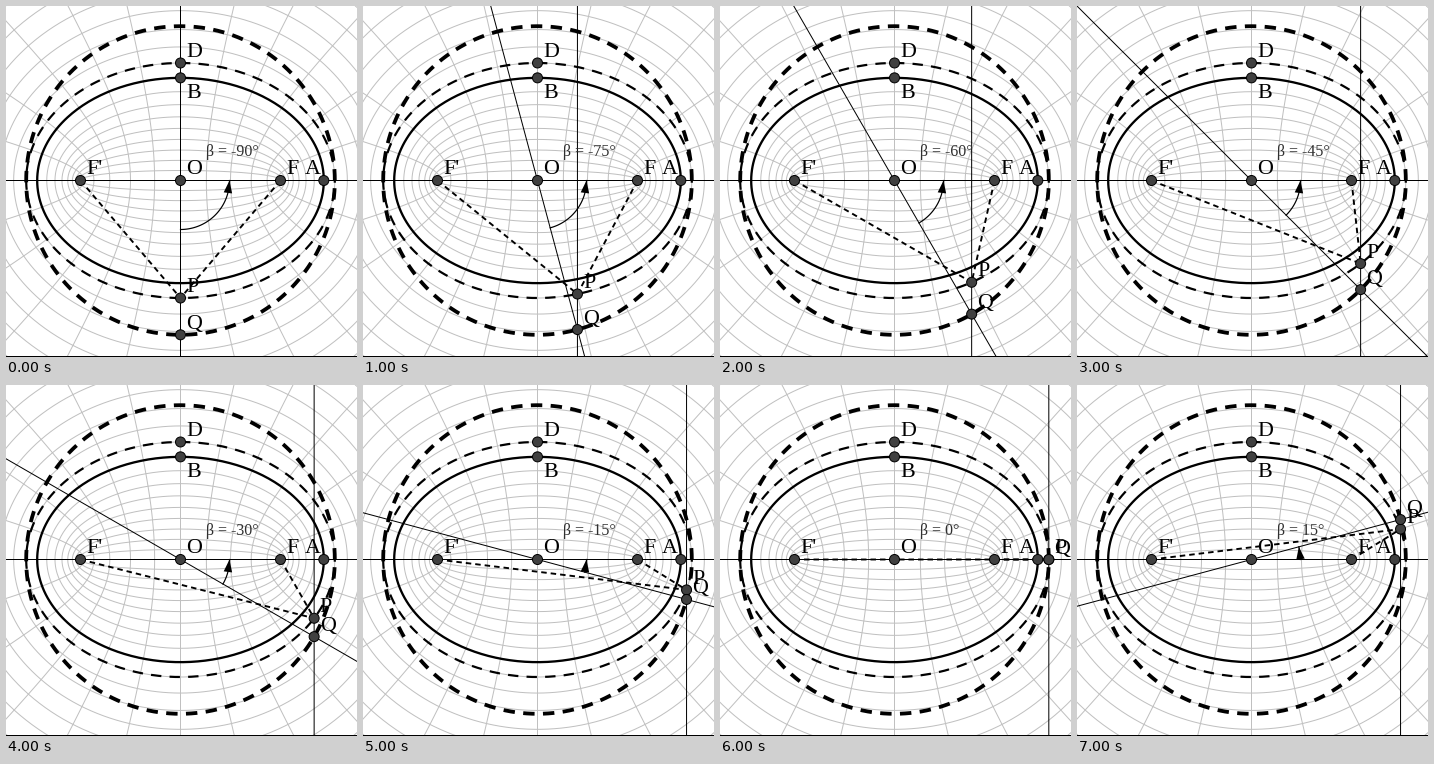
Write a matplotlib script that moves like this. It is 351 by 351 pixels and loops after 8 s.

```python
import numpy as np
import matplotlib.pyplot as plt
from matplotlib.animation import FuncAnimation
from matplotlib.patches import Circle

SIZE = 351
DPI = 72
MID = 174.5      # screen position of the centre O
FOCUS = 100      # half the distance between the foci
ARC_R = 49
MU_SOLID, MU_DASHED = 0.9, 1.0

plt.rcParams["lines.scale_dashes"] = False
plt.rcParams["path.snap"] = False
plt.rcParams["font.family"] = "Liberation Serif"

fig = plt.figure(figsize=(SIZE / DPI, SIZE / DPI), dpi=DPI, facecolor="white")
ax = fig.add_axes([0, 0, 1, 1])
ax.set_xlim(0, SIZE)
ax.set_ylim(SIZE, 0)
ax.axis("off")


def elliptic(mu, nu):
    """Screen position of the elliptic coordinates (mu, nu)."""
    return (MID + FOCUS * np.cosh(mu) * np.cos(nu),
            MID - FOCUS * np.sinh(mu) * np.sin(nu))


def polar(r, angle):
    return MID + r * np.cos(angle), MID - r * np.sin(angle)


def curve(xy=((), ()), lw=1.0, color="black", z=2, dash=None):
    style = (0, dash) if dash else "-"
    return ax.plot(*xy, lw=lw, color=color, zorder=z, linestyle=style)[0]


def dot(x=0, y=0):
    return ax.add_patch(Circle((x, y), 5, fc="#404040", ec="black",
                               lw=1, zorder=5))


def label(text, x=0, y=0, size=22, color="black"):
    return ax.text(x, y, text, fontsize=size, color=color, zorder=6,
                   ha="left", va="baseline")


# confocal grid
turn = np.linspace(0, 2 * np.pi, 361)
for mu in np.arange(1, 21) * 0.1:
    curve(elliptic(mu, turn), color="#c0c0c0", z=1)
reach = np.linspace(0, 2, 80)
for nu in np.radians(np.arange(0, 360, 15)):
    curve(elliptic(reach, nu), color="#c0c0c0", z=1)

# fixed curves
radius = FOCUS * np.cosh(MU_DASHED)
curve(([0, SIZE], [MID, MID]))
curve(([0, SIZE], [SIZE - 0.5] * 2))
curve(elliptic(MU_SOLID, turn), lw=2.3)
curve(elliptic(MU_DASHED, turn), lw=2.2, dash=(10.4, 8.2))
curve(polar(radius, turn), lw=3.8, dash=(11.4, 8.4))

# fixed points
x_a, _ = elliptic(MU_SOLID, 0)
_, y_b = elliptic(MU_SOLID, np.pi / 2)
_, y_d = elliptic(MU_DASHED, np.pi / 2)
for name, x, y, dx, dy in (("O", MID, MID, 5.5, -6),
                           ("F", MID + FOCUS, MID, 5.5, -6),
                           ("F'", MID - FOCUS, MID, 5.5, -6),
                           ("A", x_a, MID, -19, -6),
                           ("B", MID, y_b, 5.5, 20),
                           ("D", MID, y_d, 5.5, -6)):
    dot(x, y)
    label(name, x + dx, y + dy)

# moving parts
vertical, ray = curve(), curve()
to_left = curve(lw=1.9, dash=(5.5, 4))
to_right = curve(lw=1.9, dash=(5.5, 4))
arc = curve(lw=1.2)
head = ax.fill([0, 0, 0], [0, 0, 0], color="black", lw=0, zorder=3)[0]
p_dot, q_dot = dot(), dot()
p_label, q_label = label("P"), label("Q")
readout = label("", 200, 150, size=16, color="#303030")


def place(point, text, x, y):
    point.center = x, y
    text.set_position((x + 5.5, y - 6))


def draw_arc(beta):
    start, end = min(beta, 0), max(beta, 0)
    arc.set_data(*polar(ARC_R, np.linspace(start, end, 60)))
    head.set_visible(beta != 0)
    tip = np.array(polar(ARC_R, end))
    back = np.array(polar(ARC_R, end - 12.5 / ARC_R)) - tip
    back *= 12.5 / np.hypot(*back)
    side = np.array([-back[1], back[0]]) * 0.34
    head.set_xy([tip, tip + back + side, tip + back - side])


def update(i):
    degrees = -90 + 15 * i
    beta = np.radians(degrees)
    px, py = elliptic(MU_DASHED, beta)
    qx, qy = polar(radius, beta)
    vertical.set_data([px, px], [0, SIZE])
    ray.set_data(*polar(np.array([-400, 400]), beta))
    to_left.set_data([MID - FOCUS, px], [MID, py])
    to_right.set_data([MID + FOCUS, px], [MID, py])
    place(p_dot, p_label, px, py)
    place(q_dot, q_label, qx, qy)
    draw_arc(beta)
    readout.set_text(f"β = {degrees}°")
    return ()


anim = FuncAnimation(fig, update, frames=8, interval=1000, repeat=True,
                     repeat_delay=0, blit=False)
plt.show()
```
